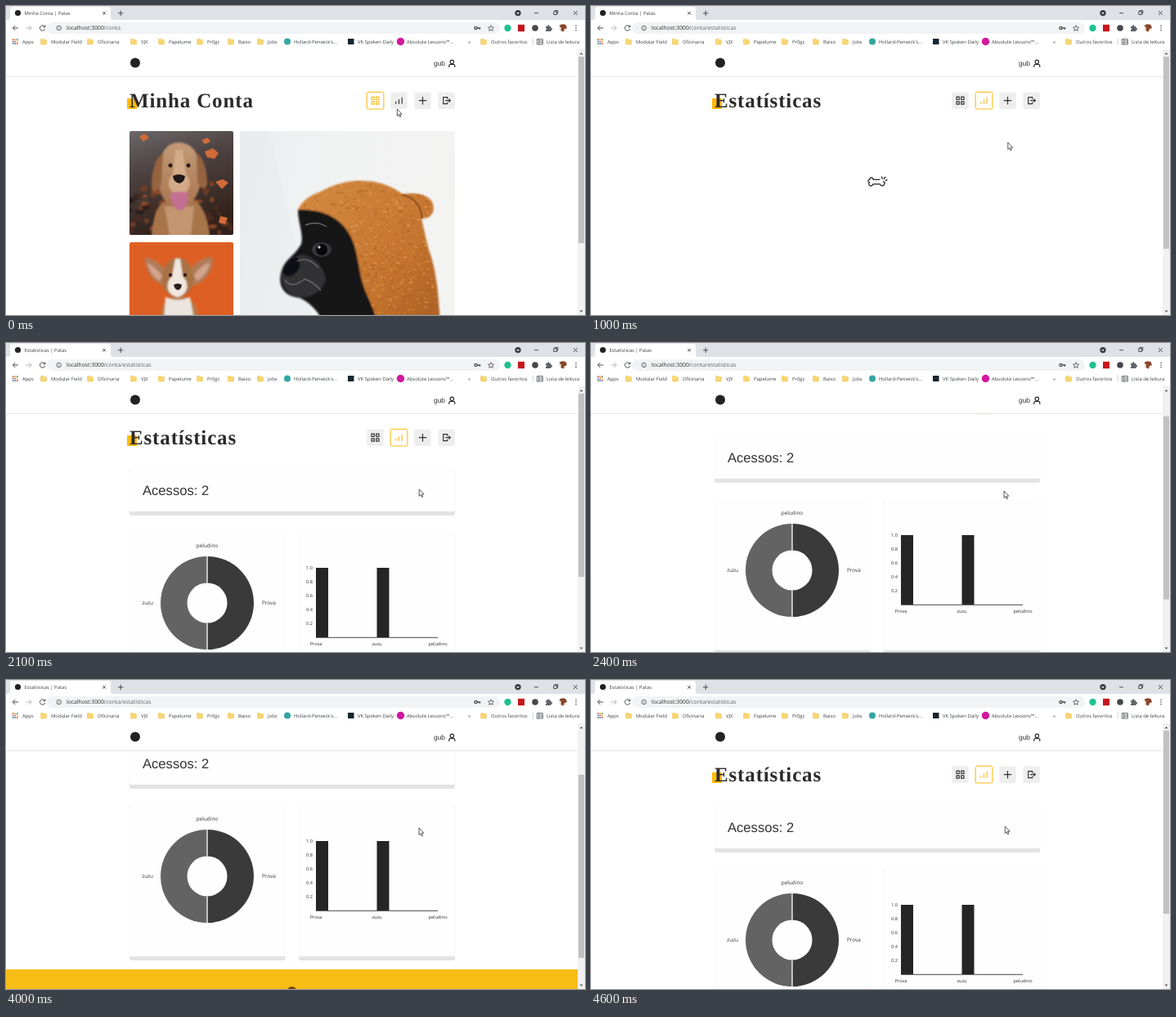
Write an HTML page that moves like this. It is 708x378 px and loops after 4700 ms.

```html
<!DOCTYPE html>
<html lang="pt-BR">
<head>
<meta charset="utf-8">
<title>Minha Conta</title>
<style>
html, body { margin: 0; width: 100%; height: 100%; overflow: hidden; background: #fff; }
svg { display: block; }
text { font-family: "Open Sans", "Noto Sans", sans-serif; fill: #3c4043; text-rendering: geometricPrecision; }
.small { font-size: 5.9px; }
.url { font-size: 6.8px; fill: #5f6368; }
.arial { font-family: "Liberation Sans", Arial, sans-serif; fill: #333; }
.title { font: bold 25px "Liberation Serif", serif; letter-spacing: .85px; fill: #2b2b2b; }
.label { font-size: 6.4px; fill: #333; }
.tick { font-size: 5.6px; fill: #333; }
.line { fill: none; stroke: #4a4d51; stroke-width: 1; }
.btn { color: #333; }
.btn .box { fill: #eee; }
.btn .glow { fill: none; }
.btn .icon { fill: none; stroke: currentColor; stroke-width: 1.2; }
.btn.on { color: #fcbf2c; }
.btn.on .box { fill: #fff; stroke: #fcc540; }
.btn.on .glow { stroke: #feeab2; }
</style>
</head>
<body>
<svg id="stage" width="708" height="378" viewBox="0 0 708 378">
  <defs>
    <linearGradient id="autumn" x2=".3" y2="1">
      <stop stop-color="#6c6769"/><stop offset=".4" stop-color="#4d4241"/><stop offset="1" stop-color="#32211b"/>
    </linearGradient>
    <linearGradient id="studio" x2="1" y2=".3">
      <stop stop-color="#eaedf0"/><stop offset=".45" stop-color="#f1f2f2"/><stop offset="1" stop-color="#f3f3f2"/>
    </linearGradient>
    <linearGradient id="cloth" x2="1" y2="1">
      <stop stop-color="#d58a42"/><stop offset=".6" stop-color="#c4742f"/><stop offset="1" stop-color="#a65b20"/>
    </linearGradient>
    <linearGradient id="fur" x2="0" y2="1">
      <stop stop-color="#c39a78"/><stop offset="1" stop-color="#a9754e"/>
    </linearGradient>
    <path id="hood" d="M357 249c6-12 16-18 28-22 18-10 36-14 52-13 18 0 34 6 48 16 18-3 34 2 37 12 3 11-3 18-14 18 3 12 5 24 9 38 8 22 13 50 15 118H462c-6-26-14-50-22-66-6-14-7-26-10-40-4-26-14-42-31-52-14-8-28-9-42-9z"/>
    <clipPath id="clipHood"><use href="#hood"/></clipPath>
    <clipPath id="clipA"><rect x="151" y="153" width="127" height="127" rx="2"/></clipPath>
    <clipPath id="clipB"><rect x="151" y="289" width="127" height="127" rx="2"/></clipPath>
    <clipPath id="clipC"><rect x="286" y="153" width="263" height="263" rx="2"/></clipPath>
    <filter id="soft"><feGaussianBlur stdDeviation=".9"/></filter>
    <path id="folder" d="M0 1q0-1 1-1h1.8l1 1H6q1 0 1 1v3.8q0 1-1 1H1q-1 0-1-1z" fill="#f8d673" stroke="#e9bf4a" stroke-width=".5"/>
  </defs>
  <rect width="708" height="378" fill="#fff"/>

  <svg y="87" width="699" height="291" viewBox="0 87 699 291">
    <g id="page">
      <rect x="148" y="113" width="12" height="13" fill="#fb1"/>
      <text id="title" class="title" x="151" y="123.5"></text>
      <g id="buttons"></g>

      <g id="photos">
        <g clip-path="url(#clipA)">
          <rect x="151" y="153" width="127" height="127" fill="url(#autumn)"/>
          <g id="litter" filter="url(#soft)"></g>
          <g filter="url(#soft)">
            <path d="M178 282c1-20 6-34 13-42l42-2c10 12 15 26 16 44z" fill="#a8744c"/>
            <path d="M194 245h36l-4 36h-26z" fill="#c39671"/>
            <path d="M190 185c3-12 11-18 21-18s19 5 23 17l5 28c-4 24-15 35-27 35s-23-9-27-33z" fill="url(#fur)"/>
            <path d="M192 180c-9 5-14 22-14 40 1 9 8 8 12-2zM233 180c9 5 13 22 13 38-2 9-8 6-12-2z" fill="#96633f"/>
            <path d="M207 176h9l4 30c9 10 4 24-8 24s-18-14-8-24z" fill="#d3ab88"/>
            <path d="M201 229q11-4 22 0-1 21-10 21-11-1-12-21z" fill="#c46f93"/>
          </g>
          <path d="M204 208q7-4 15 0-1 8-7 9-7-1-8-9z" fill="#21191a"/>
          <circle cx="201" cy="195" r="2.5" fill="#2b1a14"/><circle cx="223" cy="195" r="2.5" fill="#2b1a14"/>
          <path d="M243 178l10-4 7 6-5 7-9-2zM256 215l9-3 7 4-8 8zM239 164l8-3 3 5-7 3zM163 160l6-4 6 5-7 5zM262 257l9 2-3 8-8-2z" fill="#d06a38"/>
        </g>
        <g clip-path="url(#clipB)">
          <rect x="151" y="289" width="127" height="127" fill="#de5f24"/>
          <g filter="url(#soft)">
            <path d="M190 380c0-16 6-24 20-26 16 2 24 10 25 28v34h-45z" fill="#b67b4c"/>
            <path d="M196 324c-9-11-19-17-26-15 0 16 11 30 24 33zM225 323c9-12 19-17 28-15 1 16-10 31-25 34z" fill="#b07c58"/>
            <path d="M191 330c-7-8-13-14-18-16 2 11 8 19 15 22zM230 329c6-8 13-14 19-15-2 11-8 19-16 22z" fill="#d3a48c"/>
            <path d="M191 330c3-14 9-22 19-22s16 8 19 22c2 15-6 25-19 26-14-1-21-11-19-26z" fill="#a97245"/>
            <path d="M207 309h6l3 22c8 6 8 22-6 25-15-2-15-19-7-25z" fill="#f0e6de"/>
            <path d="M195 356q15 7 30 0l5 28-19 33-18-31z" fill="#ece4de"/>
          </g>
          <path d="M205 341q5-3 10 0-1 6-5 6.500-4-1-5-6.500z" fill="#2a2021"/>
          <circle cx="201" cy="329" r="2.200" fill="#30201a"/><circle cx="219" cy="329" r="2.200" fill="#30201a"/>
        </g>
        <g clip-path="url(#clipC)">
          <rect x="286" y="153" width="263" height="263" fill="url(#studio)"/>
          <path d="M286 153h36l52 225h-88z" fill="#e3e7ec" opacity=".35"/>
          <g filter="url(#soft)">
            <path d="M357 249c26-10 50-6 66 14 16 28 30 80 48 160h-80c0-20-2-36-10-48-8-10-14-14-22-18-11-1-20-6-23-16-2-9 0-18 5-26 6-8 15-14 20-24 3-12-4-26-4-42z" fill="#151518"/>
            <path d="M337 326c4-13 14-21 27-22 14 4 26 16 27 32-6 15-20 22-33 20-12-1-23-14-21-30z" fill="#333135"/>
            <path d="M338 326c2-10 8-17 17-19 7 5 5 14-1 20-6 5-12 5-16-1z" fill="#111113"/>
            <use href="#hood" fill="url(#cloth)"/>
          </g>
          <g clip-path="url(#clipHood)">
            <g id="fleece" opacity=".5"></g>
            <path d="M484 231q22 4 25 29" fill="none" stroke="#9c5a22" stroke-width="2.500"/>
          </g>
          <path d="M341 335q8 12 24-1 12 4 20 14M356 312q14-6 26 8M366 268q14-6 26 2" fill="none" stroke="#6a676a" stroke-width="1.400"/>
          <ellipse cx="386" cy="298" rx="12" ry="9" fill="#37353a"/>
          <circle cx="386" cy="298" r="7" fill="#070709"/><circle cx="383" cy="295" r="1.700" fill="#c6cdd5"/>
        </g>
      </g>

      <g id="loader" fill="none" stroke="#222" stroke-width="1.3" stroke-linecap="round" stroke-linejoin="round">
        <path d="M353 212.300h-8c.3-3-4.500-3.200-4.200 0-2.800.3-2.200 3.200-.4 3.500-1.600 1.700-.2 4.700 2.300 4.200 1.600-.2 2-1.200 2.300-2.200h8.500c.5 2.800 4.700 2.900 4.900.2 1.500-1 .8-2.700-.9-3"/>
        <path id="sparks" d="M355.500 209l.7 2.200M359.800 209.300l-1.600 2.200M362 213l-1.700.4"/>
      </g>

      <g id="stats">
        <g id="cards"></g>
        <text class="arial" x="167" y="185.500" font-size="16.6">Acessos: 2</text>
        <path d="M246 261a57 57 0 0 1 0 114v-32.500a24.500 24.500 0 0 0 0-49z" fill="#3a3a3a"/>
        <path d="M246 261a57 57 0 0 0 0 114v-32.500a24.500 24.500 0 0 1 0-49z" fill="#636363"/>
        <path d="M246 261v32.500M246 342.500V375" stroke="#fff" stroke-width="1.3"/>
        <text class="label" x="246" y="249.500" text-anchor="middle">peludino</text>
        <text class="label" x="180" y="320.300" text-anchor="end">zuzu</text>
        <text class="label" x="313" y="320.300">Prova</text>
        <path d="M379 275h15v85h-15zM453.500 275h15v85h-15z" fill="#252525"/>
        <path d="M379 360.300h149" stroke="#333" stroke-width=".9"/>
        <g id="ticks"></g>
      </g>

      <g id="footer">
        <rect y="432" width="699" height="110" fill="#f8bc16"/>
        <circle cx="349.500" cy="459" r="6" fill="#764701"/>
        <text class="arial" x="349.500" y="482" font-size="8.2" text-anchor="middle" style="fill:#764701">Patas. Alguns direitos reservados.</text>
      </g>
    </g>
  </svg>

  <rect y="53" width="699" height="33.500" fill="#fff"/>
  <rect y="86" width="699" height="1" fill="#e6e6e6"/>
  <circle cx="158" cy="69.500" r="6" fill="#222"/>
  <text class="arial" x="523" y="73" font-size="8.4">gub</text>
  <path class="line" d="M541.800 75v-1.600q0-2 2-2h3q2 0 2 2V75" style="stroke:#222;stroke-width:1.1"/>
  <circle class="line" cx="545.300" cy="68.300" r="2.200" style="stroke:#222;stroke-width:1.1"/>

  <rect x="699" y="53" width="9" height="325" fill="#f1f1f1"/>
  <rect id="thumb" x="700" width="7" fill="#c1c1c1"/>
  <path d="M701.500 59.300l2-2.300 2 2.300zM701.500 372.500l2 2.300 2-2.300z" fill="#555"/>

  <rect width="708" height="17" fill="#dee1e6"/>
  <path d="M2 17q3 0 3-3V4q0-3 3-3h117q3 0 3 3v10q0 3 3 3z" fill="#fff"/>
  <circle cx="14.500" cy="8.500" r="3.600" fill="#222"/>
  <text id="tab" class="small" x="22.500" y="10.800"></text>
  <path class="line" d="M118.300 7l3.600 3.600m0-3.600l-3.600 3.600M137 8.800h6.400m-3.200-3.200V12M646 8.700h5M694 6.200l4.800 4.800m0-4.800L694 11M669.800 6.800h3.700v3.700h-3.700zM671 6.600V5.500h3.700v3.700h-1"/>
  <circle cx="626" cy="8.600" r="3.700" fill="#3c4043"/><path d="M624.300 8l1.700 2 1.700-2z" fill="#fff"/>

  <rect y="17" width="708" height="36" fill="#fff"/>
  <rect x="50" y="20" width="554" height="14" rx="7" fill="#f1f3f4"/>
  <path class="line" d="M15 27H8.300m3-3l-3 3 3 3"/>
  <path class="line" d="M24.500 27h6.700m-3-3l3 3-3 3" style="stroke:#b4b6b9"/>
  <path class="line" d="M47.400 25.300a3.200 3.200 0 1 0 .3 2.700M47.900 23.300v2.500h-2.500"/>
  <circle class="line" cx="64.700" cy="27" r="2.800" style="stroke-width:.8"/><path class="line" d="M64.700 26.700v1.800m0-3.200v.7" style="stroke-width:.8"/>
  <text class="url" x="74" y="29.400"><tspan fill="#27292c">localhost:3000</tspan><tspan id="path"></tspan></text>
  <circle class="line" cx="574.500" cy="27" r="1.600" style="stroke-width:1.3"/><path class="line" d="M576 27h4.300m-1 0v1.800" style="stroke-width:1.3"/>
  <path class="line" d="M593 23.700l1 2.300 2.500.2-1.900 1.700.6 2.400-2.200-1.300-2.200 1.300.6-2.400-1.900-1.700 2.500-.2z" style="stroke-width:.8"/>
  <circle cx="613.500" cy="27" r="4.200" fill="#1fc28e"/>
  <rect x="626" y="22.800" width="8" height="8.400" fill="#c4161c"/>
  <circle cx="647" cy="27" r="3.800" fill="#45474a"/>
  <path d="M660 25h2v-.6a1.200 1.200 0 0 1 2.400 0v.6h2v2h.5a1.200 1.200 0 0 1 0 2.400h-.5V31H660v-1.700a1.300 1.300 0 0 0 0-2.500z" fill="#5f6368"/>
  <circle cx="681" cy="27" r="4.800" fill="#f1e6dc"/>
  <path d="M676.500 24q3-3 8-1l1.500 4-3 1-1.500 3.500-3-1.500.5-3z" fill="#87472a"/>
  <g fill="#4a4d51"><circle cx="697" cy="24.300" r=".8"/><circle cx="697" cy="27" r=".8"/><circle cx="697" cy="29.700" r=".8"/></g>

  <g id="bookmarks"></g>
  <circle cx="344" cy="43.500" r="4" fill="#35a6a0"/>
  <rect x="418" y="40" width="7.500" height="7" fill="#16262e"/>
  <circle cx="482.500" cy="43.500" r="4.700" fill="#d3179c"/>
  <path d="M644.300 39.500v8" stroke="#c8cacd" stroke-width=".8"/>
  <path class="line" d="M649.300 40.500h7v6.500h-7zM651.300 40.500V47M651.300 42.700h5m-5 2.100h5" style="stroke-width:.8"/>

  <path id="cursor" d="M0 0v8.500l1.900-1.800 1.300 3.100 1.400-.6-1.300-3h2.600z" fill="#fff" stroke="#333" stroke-width=".8" stroke-linejoin="round"/>
</svg>

<script>
const LOOP = 4700, STEP = 100;
const $ = id => document.getElementById(id);
const fill = (id, parts) => { $(id).innerHTML = parts.join(''); };
const label = (cls, x, y, text, anchor = 'start') =>
  `<text class="${cls}" x="${x}" y="${y}" text-anchor="${anchor}">${text}</text>`;

// Seeded dabs of colour over a box, for fleece and fallen leaves
let seed = 7;
const rand = () => (seed = seed * 16807 % 2147483647) / 2147483647;
const dabs = (count, x, y, w, h, size, colors) => Array.from({ length: count }, () =>
  `<ellipse cx="${x + w * rand()}" cy="${y + h * rand()}" rx="${size * (.5 + rand())}"
    ry="${size * (.4 + rand() * .6)}" fill="${colors[Math.floor(rand() * colors.length)]}"/>`);
fill('fleece', dabs(900, 357, 213, 184, 166, 1.7, ['#e6a25c', '#a9601f', '#d98f48', '#b0662a']));
fill('litter', dabs(70, 151, 215, 127, 65, 4, ['#6e3c26', '#4a2a20', '#8a4a2b', '#2c1d1a']));

// Bookmark bar: text, x, has folder
const marks = [
  ['Apps', 20], ['Modular Field', 55, 1], ['Oficinaria', 112, 1], ['VJX', 165, 1],
  ['Papelume', 199, 1], ['Pr0gz', 246, 1], ['Baixo', 284, 1], ['Jobs', 320, 1],
  ["Hollard-Penwick's...", 352], ['VK Spoken Daily', 430], ['Absolute Lessons™...', 490],
  ['»', 565], ['Outros favoritos', 593, 1], ['Lista de leitura', 661]
];
const dots = ['#d9503f', '#e8a33a', '#4b8b4f', '#4b7fd1', '#d9503f', '#e8a33a', '#4b8b4f', '#4b7fd1', '#d9503f'];
fill('bookmarks', [
  ...marks.map(([text, x, folder]) =>
    (folder ? `<use href="#folder" x="${x - 12.5}" y="40.2"/>` : '') + label('small', x, 45.8, text)),
  ...dots.map((c, i) =>
    `<rect x="${7.8 + i % 3 * 2.5}" y="${40.2 + Math.floor(i / 3) * 2.5}" width="1.7" height="1.7" fill="${c}"/>`)
]);

// Toolbar buttons, icons drawn around each centre
const icons = [
  'M-4.500-4.500h3.300v3.300h-3.300zM1.200-4.500h3.300v3.300H1.200zM-4.500 1.200h3.300v3.300h-3.300zM1.200 1.200h3.300v3.300H1.200z',
  'M-3.700 4V1M0 4V-1.500M3.700 4V-4',
  'M-4.700 0h9.400M0-4.700v9.400',
  'M1-2v-2h-5v8h5V2M-1.500 0h6M2.700-2l2 2-2 2'
];
fill('buttons', icons.map((d, i) =>
  `<g class="btn" transform="translate(${[451.5, 480.5, 509.5, 538.7][i]} 115.7)">
    <rect class="glow" x="-11" y="-11" width="22" height="22" rx="2.500"/>
    <rect class="box" x="-10.2" y="-10.2" width="20.4" height="20.4" rx="2"/>
    <path class="icon" d="${d}" stroke-linejoin="round"/></g>`));
const buttons = [...document.querySelectorAll('.btn')];

fill('cards', [[151, 153, 398, 58], [358, 230, 191, 191], [151, 230, 190.5, 191]].map(([x, y, w, h]) =>
  `<rect x="${x}" y="${y}" width="${w}" height="${h}" rx="2.500" fill="#e3e3e3"/>
   <rect x="${x}" y="${y}" width="${w}" height="${h - 5}" rx="2" fill="#fefefe"/>
   <path d="M${x} ${y}v${h - 6}m${w} 0v${6 - h}" stroke="#f6f6f6" stroke-width=".8"/>`));

fill('ticks', [
  ...[1, .8, .6, .4, .2].map(v => label('tick', 375, 362.3 - v * 85, v.toFixed(1), 'end')),
  ...['Prova', 'zuzu', 'peludino'].map((s, i) => label('tick', 379 + i * 74.5, 370.2, s, 'middle'))
]);

// Keys: time, value
const scrollKeys = [[2100, 0], [2200, 4], [2300, 16], [2400, 40], [2500, 78], [2600, 104],
  [3900, 104], [4000, 78], [4100, 52], [4200, 28], [4300, 12], [4400, 3], [4500, 0]];
const fadeKeys = [[1500, 0], [1600, .3], [1700, .75], [1800, 1]];
const xKeys = [[0, 478.3], [200, 480], [300, 486], [400, 496], [500, 504], [600, 509], [700, 509.8],
  [1400, 509.8], [1600, 507], [1700, 506], [2200, 505], [4400, 505], [4500, 506.3]];
const yKeys = [[0, 126], [100, 121], [200, 119], [300, 128], [400, 142], [500, 152], [600, 158], [800, 163],
  [900, 163], [1000, 167], [1500, 167], [1700, 170], [2200, 181], [4400, 181], [4500, 179]];

function at(keys, t) {
  const n = keys.findIndex(k => k[0] > t);
  if (n === 0) return keys[0][1];
  if (n < 0) return keys[keys.length - 1][1];
  const [t0, a] = keys[n - 1], [t1, b] = keys[n];
  return a + (b - a) * (t - t0) / (t1 - t0);
}
const show = (id, on) => { $(id).style.display = on ? '' : 'none'; };

function draw(ms) {
  const t = Math.floor(ms % LOOP / STEP) * STEP;
  const stats = t >= 200, ready = t >= 1600;
  const scroll = at(scrollKeys, t), fade = at(fadeKeys, t);

  $('title').textContent = stats ? 'Estatísticas' : 'Minha Conta';
  $('path').textContent = stats ? '/conta/estatisticas' : '/conta';
  $('tab').textContent = (t >= 1800 ? 'Estatísticas' : 'Minha Conta') + ' | Patas';
  buttons.forEach((b, i) => b.classList.toggle('on', i === Number(stats)));

  show('photos', !stats);
  show('loader', stats && !ready);
  show('sparks', ![300, 700, 1100, 1300].includes(t));
  show('stats', ready);
  show('footer', ready);
  $('stats').setAttribute('opacity', fade);
  $('stats').setAttribute('transform', `translate(${-10.4 * (1 - fade)} 0)`);

  $('page').setAttribute('transform', `translate(0 ${-scroll})`);
  $('thumb').setAttribute('y', 62 + scroll * .69);
  $('thumb').setAttribute('height', ready ? 224 : stats ? 235 : 228);
  $('cursor').setAttribute('transform', `translate(${at(xKeys, t)} ${at(yKeys, t)})`);
}

const start = performance.now();
function tick() {
  draw(performance.now() - start);
  requestAnimationFrame(tick);
}
tick();
</script>
</body>
</html>
```
